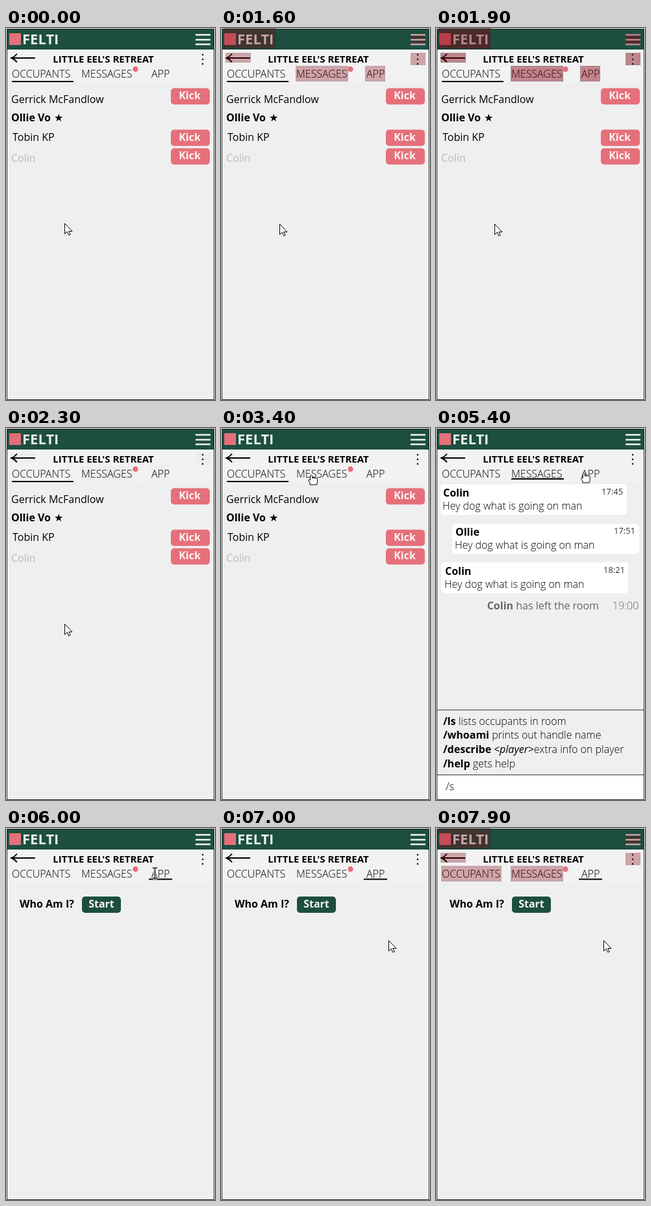
Animation of 322 by 570 pixels, one loop 8000 ms. Source, as an HTML page:

```html
<!DOCTYPE html>
<html lang="en">
<head>
<meta charset="utf-8">
<title>Room prototype</title>
<style>
html, body { margin: 0; width: 100%; height: 100%; overflow: hidden; background: #fff; }
svg { display: block; width: 322px; height: 570px; }
text { font: 16px "Open Sans", "Noto Sans", sans-serif; }
.light { font-weight: 300; }
.bold { font-weight: 700; }
.small { font-size: 13px; font-weight: 400; fill: #333; }
.muted { fill: #666; }
.title { font-size: 15px; font-weight: 700; }
.brand { font-size: 22px; font-weight: 700; fill: #e9efec; }
.star { font-family: "DejaVu Sans", sans-serif; }
.caption { fill: #fdf3f3; font-weight: 700; text-anchor: middle; }
.line { fill: none; stroke: #000; stroke-width: 2; }

.timed { animation: 8s infinite step-end; }
.occupants { animation-name: occupants; }
.messages { animation-name: messages; }
.app { animation-name: app; }
.badge { animation-name: badge; }
.arrow { animation-name: arrow; }
.hand { animation-name: hand; }
.beam { animation-name: beam; }
.tooltip { animation-name: tooltip; }
.flash { fill: #82000f; stroke: #40000a; opacity: 0; animation: flash 8s linear infinite; }
.pointer { animation: move 8s infinite; }

@keyframes occupants { 0% { opacity: 1 } 47.5%, 100% { opacity: 0 } }
@keyframes messages { 0% { opacity: 0 } 47.5% { opacity: 1 } 73.75%, 100% { opacity: 0 } }
@keyframes app { 0% { opacity: 0 } 73.75%, 100% { opacity: 1 } }
@keyframes badge { 0% { opacity: 1 } 47.5% { opacity: 0 } 73.75%, 100% { opacity: 1 } }
@keyframes arrow { 0% { opacity: 1 } 41.25% { opacity: 0 } 59.5% { opacity: 1 } 62.5% { opacity: 0 } 82.5%, 100% { opacity: 1 } }
@keyframes hand { 0% { opacity: 0 } 41.25% { opacity: 1 } 47.5% { opacity: 0 } 62.5% { opacity: 1 } 75%, 100% { opacity: 0 } }
@keyframes beam { 0% { opacity: 0 } 47.5% { opacity: 1 } 59.5% { opacity: 0 } 75% { opacity: 1 } 82.5%, 100% { opacity: 0 } }
@keyframes tooltip { 0% { opacity: 0 } 5% { opacity: 1 } 20% { opacity: 0 } 91.25% { opacity: 1 } 96.25%, 100% { opacity: 0 } }
@keyframes flash {
  0%, 19.99% { opacity: 0 } 20% { opacity: .32 } 22.5%, 24.4% { opacity: .45 }
  28.75% { opacity: .02 } 30%, 98.74% { opacity: 0 } 98.75% { opacity: .32 } 100% { opacity: .4 }
}
@keyframes move {
  0% { transform: translate(90px, 299px); animation-timing-function: step-end }
  20% { transform: translate(90px, 300px) }
  31.25% { transform: translate(90px, 300px); animation-timing-function: ease-in-out }
  42.5% { transform: translate(139px, 71px) }
  47.5%, 54.5% { transform: translate(138px, 71px); animation-timing-function: ease-in }
  60% { transform: translate(196px, 64px); animation-timing-function: ease-out }
  65%, 66.25% { transform: translate(226px, 66px) }
  70%, 78.74% { transform: translate(229px, 69px) }
  78.75%, 81.25% { transform: translate(229px, 70px); animation-timing-function: ease-in-out }
  87.5%, 100% { transform: translate(258px, 172px) }
}
</style>
</head>
<body>
<svg viewBox="0 0 322 570">
  <defs>
    <g id="kick">
      <rect width="60" height="25" rx="5" fill="#e5707a"/>
      <text class="caption" x="29" y="17">Kick</text>
    </g>
    <path id="beam" d="M-3-8H-1L.5-7L2-8H4M-3 8H-1L.5 7L2 8H4M.5-7V7"/>
  </defs>

  <rect x="1" y="1" width="320" height="569" fill="#efefef"/>
  <rect x="2" y="33" width="318" height="50" fill="#f2f2f2"/>
  <rect x="1" y="1" width="320" height="32" fill="#1c4f40"/>
  <rect x="5" y="8" width="18" height="18" fill="#e5707a"/>
  <text class="brand" x="25" y="25">FELTI</text>
  <path d="M292 10.5h23M292 18h23M292 25h23" stroke="#f2f5f3" stroke-width="2.5"/>
  <path class="line" d="M45 46H9M17 39.5Q13.500 44 8.500 46Q13.500 48 17 52.500"/>
  <g><circle cx="303" cy="41" r="1.300"/><circle cx="303" cy="48" r="1.300"/><circle cx="303" cy="55" r="1.300"/></g>
  <text class="title" x="150" y="53" text-anchor="middle">LITTLE EEL'S RETREAT</text>
  <text class="light" x="9" y="76">OCCUPANTS</text>
  <text class="light" x="116" y="76">MESSAGES</text>
  <text class="light" x="224" y="76">APP</text>

  <g class="timed occupants">
    <path class="line" d="M9 82h95"/>
    <text x="8" y="115">Gerrick McFandlow</text>
    <text class="bold" x="8" y="143">Ollie Vo</text>
    <text class="star" x="74" y="143">★</text>
    <text x="10" y="173">Tobin KP</text>
    <text x="8" y="205" fill="#b9b9b9">Colin</text>
    <use href="#kick" x="254" y="92.300"/>
    <use href="#kick" x="254" y="155.700"/>
    <use href="#kick" x="254" y="184.300"/>
    <rect class="flash" x="222.500" y="58.500" width="30" height="23"/>
  </g>

  <g class="timed messages">
    <path class="line" d="M116 78h81"/>
    <g fill="#fff">
      <rect x="7" y="86" width="287" height="47" rx="5"/>
      <rect x="25" y="147" width="288" height="46" rx="5"/>
      <rect x="8" y="206" width="288" height="47" rx="5"/>
    </g>
    <text class="bold" x="11" y="105">Colin</text>
    <text class="small" x="255" y="102">17:45</text>
    <text class="light" x="10" y="125">Hey dog what is going on man</text>
    <text class="bold" x="30" y="165">Ollie</text>
    <text class="small" x="274" y="162">17:51</text>
    <text class="light" x="29" y="185">Hey dog what is going on man</text>
    <text class="bold" x="14" y="225">Colin</text>
    <text class="small" x="258" y="222">18:21</text>
    <text class="light" x="13" y="245">Hey dog what is going on man</text>
    <text class="muted" x="251" y="278" text-anchor="end"><tspan class="bold">Colin</tspan> has left the room</text>
    <text class="light muted" x="272" y="278">19:00</text>
    <path d="M1 432h319" stroke="#333"/>
    <rect x="1.500" y="531.500" width="319" height="38" fill="#fff" stroke="#333"/>
    <text class="light" x="11" y="455"><tspan class="bold">/ls</tspan> lists occupants in room</text>
    <text class="light" x="11" y="476"><tspan class="bold">/whoami</tspan> prints out handle name</text>
    <text class="light" x="11" y="498"><tspan class="bold">/describe</tspan> <tspan font-style="italic" font-weight="400">&lt;player&gt;</tspan>extra info on player</text>
    <text class="light" x="11" y="520"><tspan class="bold">/help</tspan> gets help</text>
    <text class="light" x="15" y="555">/s</text>
  </g>

  <g class="timed app">
    <path class="line" d="M220 78.500h36"/>
    <text class="bold" x="21" y="122">Who Am I?</text>
    <rect x="117" y="105" width="60" height="25" rx="5" fill="#1c4f40"/>
    <text class="caption" x="147" y="122">Start</text>
    <rect class="flash" x="8.500" y="58.500" width="92" height="23"/>
  </g>

  <g class="flash">
    <rect x="4.500" y=".5" width="79" height="31"/>
    <rect x="292.500" y="9.500" width="22" height="16"/>
    <rect x="7.500" y="38.500" width="38" height="14"/>
    <rect x="292.500" y="38.500" width="22" height="18"/>
    <rect x="115.500" y="58.500" width="80" height="23"/>
  </g>
  <circle class="timed badge" cx="199.500" cy="63" r="4.200" fill="#e5707a"/>
  <rect x="1.500" y="1.500" width="319" height="568" fill="none" stroke="#222"/>

  <g class="pointer">
    <path class="timed arrow" d="M.5.5V16.500L4.200 13L6.800 18.500L9.200 17.400L6.700 12.500H12z" fill="#fff" stroke="#000"/>
    <path class="timed hand" d="M-1.500 9V2Q0-.5 1.500 2V5.500H7.500Q9.500 5.500 9.500 7.500V12L8.500 16H-2V13L-4.500 9.500Q-4.500 7.500-1.500 9Z" fill="#fff" stroke="#000"/>
    <g class="timed beam" fill="none">
      <use href="#beam" stroke="#fff" stroke-width="3.500"/>
      <use href="#beam" stroke="#000" stroke-width="1.400"/>
    </g>
    <g class="timed tooltip">
      <rect x="5" y="12" width="86" height="37" rx="5" fill="#2b2b2b"/>
      <text x="48" y="36" text-anchor="middle" style="font-size:14px" fill="#fff">Rectangle</text>
    </g>
  </g>
</svg>
</body>
</html>
```
